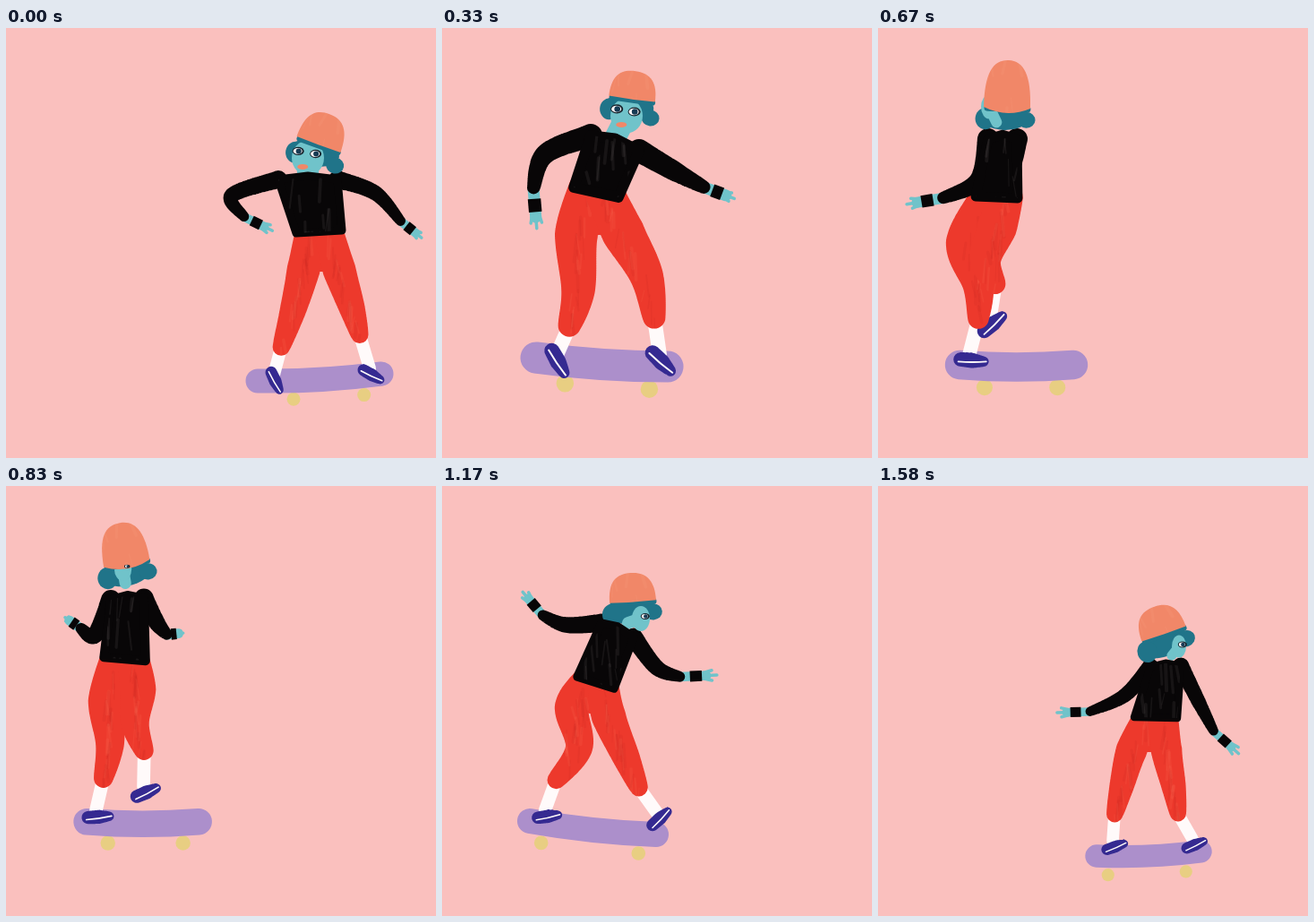
These frames come from a looping animation (480 by 480 pixels, 1660 ms). An HTML page with a canvas:

```html
<!DOCTYPE html>
<html lang="en">
<head>
<meta charset="utf-8">
<title>Skater</title>
<style>
html, body { margin: 0; width: 100%; height: 100%; overflow: hidden; background: #fac0be; }
canvas { display: block; width: 480px; height: 480px; }
</style>
</head>
<body>
<canvas id="stage" width="480" height="480"></canvas>
<script>
const ctx = document.getElementById('stage').getContext('2d');
const LOOP = 1660, STEPS = 20;
const COLOR = {
  ground: '#fac0be', board: '#ac8fcb', wheel: '#e8ce82', shoe: '#352a91', pants: '#ed392c',
  black: '#080607', skin: '#70c3ca', hair: '#207489', hat: '#f18768', white: '#fffafa'
};

// Key poses of the rig; everything else is built around these joints.
// board: two ends, place of the first wheel   waist: left, right
// arms: shoulder, elbow, wrist, fingertip     legs: thigh, knee, ankle
// feet: centre, angle   head: middle of the brim, tilt, hat height
// face: centre, half width, eye size          sweep: extra travel on the way to the next pose
const poses = [
  { step: 0, scale: [1], sweep: [0, 24], board: [281, 394, 419, 386, 0.29], waist: [324, 229, 375, 226],
    armA: [304, 169, 252, 187, 266, 211, 299, 227], armB: [370, 169, 412, 184, 441, 216, 465, 235],
    legA: [332, 270, 320, 316, 307, 357], legB: [372, 270, 386, 312, 395, 343],
    footA: [301, 393, 60], footB: [408, 386, 25], head: [349, 130, 20, 36], face: [337, 145, 18, 5.5] },
  { step: 4, scale: [1.3], sweep: [-28, -14], board: [105, 368, 252, 378, 0.22], waist: [147, 178, 197, 189],
    armA: [166, 120, 115, 141, 102, 179, 106, 226], armB: [220, 137, 260, 160, 293, 178, 328, 191],
    legA: [150, 230, 152, 292, 142, 333], legB: [202, 228, 228, 276, 237, 324],
    footA: [130, 371, 56], footB: [245, 371, 40], head: [212, 79, 8, 31], face: [206, 98, 18, 6] },
  { step: 8, scale: [1.2], sweep: [0, 0], board: [91, 376, 218, 376, 0.22], waist: [109, 188, 156, 190],
    armA: [123, 124, 112, 170, 72, 190, 30, 197], armB: [155, 124, 150, 152, 142, 170, 138, 178],
    legA: [98, 240, 112, 287, 112, 325], legB: [133, 222, 120, 258, 131, 286],
    footA: [104, 370, 0], footB: [127, 330, -45], head: [144, 89, 2, 53], face: [124, 88, 9, 0] },
  { step: 12, scale: [1], sweep: [0, 0], board: [91, 373, 217, 375, 0.15], waist: [116, 196, 162, 203],
    armA: [120, 132, 91, 160, 99, 127, 106, 97], armB: [163, 132, 200, 158, 234, 167, 280, 156],
    legA: [132, 240, 126, 289, 109, 330], legB: [169, 235, 180, 275, 190, 312],
    footA: [104, 367, -13], footB: [199, 358, -8], head: [138, 87, -20, 36], face: [151, 102, 11, 5] },
  { step: 14, scale: [1.04], sweep: [0, 0], board: [98, 374, 239, 389, 0.09], waist: [151, 213, 192, 226],
    armA: [178, 153, 138, 155, 112, 144, 89, 117], armB: [214, 169, 240, 203, 266, 213, 309, 211],
    legA: [145, 247, 153, 292, 127, 329], legB: [186, 257, 206, 304, 220, 337],
    footA: [117, 368, -13], footB: [242, 371, -47], head: [213, 129, -4, 32], face: [222, 148, 10, 4] },
  { step: 17, scale: [1], sweep: [0, 2], board: [180, 399, 303, 403, 0.11], waist: [222, 247, 275, 253],
    armA: [240, 201, 208, 206, 180, 198, 150, 180], armB: [288, 206, 309, 244, 331, 273, 360, 285],
    legA: [223, 285, 214, 325, 200, 355], legB: [257, 290, 268, 332, 277, 366],
    footA: [198, 389, -22], footB: [292, 398, -33], head: [283, 170, -10, 30], face: [295, 185, 6, 0] },
  { step: 19, scale: [0.94], sweep: [0, 0], board: [244, 413, 360, 408, 0.11], waist: [286, 258, 334, 259],
    armA: [304, 202, 275, 234, 236, 252, 198, 253], armB: [338, 201, 358, 241, 375, 274, 404, 300],
    legA: [283, 295, 272, 335, 264, 367], legB: [322, 295, 330, 335, 335, 366],
    footA: [264, 402, -24], footB: [353, 400, -27], head: [319, 165, -19, 32], face: [336, 179, 8, 4] }
];

// Pose with wrap-around, its step shifted by whole loops.
function poseAt(i) {
  const n = poses.length, lap = Math.floor(i / n), parts = poses[i - lap * n];
  return { step: parts.step + lap * STEPS, parts };
}

function blend(step) {
  let i = poses.length - 1;
  while (poses[i].step > step) i--;
  const [p, a, b, q] = [-1, 0, 1, 2].map(k => poseAt(i + k));
  const span = b.step - a.step, u = (step - a.step) / span;
  const hermite = (vp, va, vb, vq) => {
    const ma = (vb - vp) / (b.step - p.step) * span * 0.6;
    const mb = (vq - va) / (q.step - a.step) * span * 0.6;
    const u2 = u * u, u3 = u2 * u;
    return va + (vb - va) * (3 * u2 - 2 * u3) + ma * (u3 - 2 * u2 + u) + mb * (u3 - u2);
  };
  const out = {};
  for (const key in a.parts) {
    if (key === 'step') continue;
    out[key] = a.parts[key].map((v, j) => hermite(p.parts[key][j], v, b.parts[key][j], q.parts[key][j]));
  }
  out.sweep = a.parts.sweep.map(v => v * Math.sin(Math.PI * u));
  return out;
}

function random(seed) {
  return () => {
    seed = (seed * 16807) % 2147483647;
    return seed / 2147483647;
  };
}

const mix = (a, b, t) => a + (b - a) * t;
const between = (a, b, t) => [mix(a[0], b[0], t), mix(a[1], b[1], t)];
const points = list => Array.from({ length: list.length / 2 }, (_, i) => list.slice(2 * i, 2 * i + 2));

function disc(x, y, rx, color, ry = rx, angle = 0) {
  ctx.fillStyle = color;
  ctx.beginPath();
  ctx.ellipse(x, y, Math.max(0, rx), Math.max(0, ry), angle, 0, 7);
  ctx.fill();
}

function stroke(width, color, from, to, bend = between(from, to, 0.5)) {
  ctx.strokeStyle = color;
  ctx.lineWidth = width;
  ctx.beginPath();
  ctx.moveTo(...from);
  ctx.quadraticCurveTo(...bend, ...to);
  ctx.stroke();
}

// Curve through the joints, as wide as given at each of them.
function limb(pts, widths, color) {
  const path = new Path2D(), last = pts.length - 1;
  for (let i = 0; i < last; i++) {
    const p = pts[Math.max(0, i - 1)], a = pts[i], b = pts[i + 1], q = pts[Math.min(last, i + 2)];
    for (let u = 0; u <= 1; u += 0.04) {
      const [x, y] = [0, 1].map(k => 0.5 * (2 * a[k] + (b[k] - p[k]) * u +
        (2 * p[k] - 5 * a[k] + 4 * b[k] - q[k]) * u * u + (3 * a[k] - p[k] - 3 * b[k] + q[k]) * u ** 3));
      const r = mix(widths[i], widths[i + 1], u) / 2;
      path.moveTo(x + r, y);
      path.arc(x, y, r, 0, 2 * Math.PI);
    }
  }
  ctx.fillStyle = color;
  ctx.fill(path);
  return path;
}

function patch(corners, color, rounding) {
  const path = new Path2D();
  corners.forEach(corner => path.lineTo(...corner));
  path.closePath();
  ctx.fillStyle = ctx.strokeStyle = color;
  ctx.lineWidth = rounding;
  ctx.fill(path);
  ctx.stroke(path);
  return path;
}

// Faint dry-brush lines inside a shape.
function brush(path, corners, color, seed, count) {
  const rnd = random(seed), pick = () => corners[Math.floor(rnd() * corners.length)];
  ctx.save();
  ctx.clip(path);
  ctx.globalAlpha = 0.09;
  for (let i = 0; i < count; i++) {
    const [x, y] = between(pick(), pick(), 0.2 + rnd() * 0.6);
    stroke(1 + rnd() * 3, color, [x, y], [x + rnd() * 8 - 4, y + 12 + rnd() * 20]);
  }
  ctx.restore();
}

function arm(list, scale) {
  const pts = points(list), [wrist, tip] = pts.slice(2);
  const dx = tip[0] - wrist[0], dy = tip[1] - wrist[1];
  const along = (t, side = 0) => [wrist[0] + dx * t - dy * side, wrist[1] + dy * t + dx * side];
  const hand = 10 * scale;
  stroke(hand, COLOR.skin, wrist, along(0.68));
  for (const side of [-0.13, 0, 0.13]) stroke(3.5, COLOR.skin, along(0.6, side * 0.6), along(0.95 - Math.abs(side), side));
  ctx.lineCap = 'butt';
  stroke(hand + 1.5, COLOR.black, along(0.25), along(0.56));
  ctx.lineCap = 'round';
  limb(pts.slice(0, 3), [20, 17, 11].map(w => w * scale), COLOR.black);
}

function leg(hip, list, scale, seed) {
  const pts = [hip, ...points(list)];
  const path = limb(pts, [33, 37, 29, 19].map(w => w * scale), COLOR.pants);
  brush(path, pts, '#a81d1b', seed, 12);
  brush(path, pts, '#ff8f70', seed + 7, 9);
}

function foot([x, y, degrees], ankle, scale) {
  stroke(14 * Math.sqrt(scale), COLOR.white, ankle, [x - 2, y - 6]);
  ctx.save();
  ctx.translate(x, y);
  ctx.rotate(degrees * Math.PI / 180);
  ctx.scale(scale, scale);
  limb([[-10, 0], [1, 1], [12, 2]], [13, 14, 9], COLOR.shoe);
  stroke(1.5, COLOR.white, [-12, 2], [14, 2], [1, 7 * Math.sign(degrees + 90) - 4]);
  ctx.restore();
}

function board([x1, y1, x2, y2, firstWheel], scale) {
  const from = [x1, y1], to = [x2, y2], width = 27 * scale;
  for (const t of [firstWheel, 0.86]) {
    const [x, y] = between(from, to, t);
    disc(x, y + width / 2 + 9, 7.5 * scale, COLOR.wheel);
  }
  const [mx, my] = between(from, to, 0.5);
  stroke(width, COLOR.board, from, to, [mx, my + 5]);
}

function eye(x, y, r) {
  if (r < 1) return;
  disc(x, y, r + 1, '#17232c', r * 0.85);
  disc(x - 0.5, y, r - 0.5, COLOR.white, r * 0.62);
  disc(x + 0.5, y, r * 0.55, '#173b54');
}

function head([x, y, degrees, height], [fx, fy, w, eyeSize], neck) {
  const tilt = degrees * Math.PI / 180;
  const front = Math.max(0, Math.min(1, (w - 12) / 6));
  const tilted = drawing => {
    ctx.save();
    ctx.translate(x, y);
    ctx.rotate(tilt * (1 - 0.5 * front));
    drawing();
    ctx.restore();
  };
  tilted(() => {
    disc(-3, 10, 28, COLOR.hair, 15);
    disc(-24, 13, 11, COLOR.hair, 12);
    disc(22, 13 + 7 * front, 10, COLOR.hair, 9);
  });
  stroke(w * 1.35, COLOR.skin, [fx, fy], between([fx, fy], neck, 0.55 + 0.4 * front));
  disc(fx, fy, w, COLOR.skin, w * 0.7 + 7);
  ctx.save();
  ctx.translate(x, y);
  ctx.rotate(tilt);
  stroke(7, COLOR.hair, [-22, 1], [23, 1]);
  const hat = new Path2D();
  hat.moveTo(-26, 0);
  hat.bezierCurveTo(-26, -height * 0.75, -17, -height, 0, -height);
  hat.bezierCurveTo(17, -height, 26, -height * 0.7, 26, 0);
  hat.quadraticCurveTo(0, height > 40 ? 12 : 1, -26, 0);
  ctx.fillStyle = COLOR.hat;
  ctx.fill(hat);
  brush(hat, [[-20, -height], [20, -height], [0, 0]], '#ffb08d', 19, 6);
  ctx.restore();
  eye(fx - w * 0.6, fy - w * 0.42, eyeSize * front);
  eye(fx + w * 0.48, fy - w * 0.25, eyeSize);
  disc(fx - w * 0.32, fy + w * 0.55, 6 * front, COLOR.hat, 3 * front);
}

function draw(step) {
  const s = blend(step), scale = s.scale[0];
  const [left, right] = points(s.waist);
  const shoulderA = s.armA.slice(0, 2), shoulderB = s.armB.slice(0, 2);
  const [nx, ny] = between(shoulderA, shoulderB, 0.5);
  const neck = [nx, ny - 4 * scale];
  ctx.fillStyle = COLOR.ground;
  ctx.fillRect(0, 0, 480, 480);
  ctx.save();
  ctx.translate(...s.sweep);
  ctx.lineCap = ctx.lineJoin = 'round';

  board(s.board, scale);
  foot(s.footA, s.legA.slice(4), scale);
  foot(s.footB, s.legB.slice(4), scale);
  patch([left, right, s.legB.slice(0, 2), s.legA.slice(0, 2)], COLOR.pants, 4);
  leg(between(left, right, 0.3), s.legA, scale, 31 + step);
  leg(between(left, right, 0.7), s.legB, scale, 53 + step);
  arm(s.armA, scale);
  arm(s.armB, scale);
  head(s.head, s.face, neck);
  const chest = [shoulderA, neck, shoulderB, right, left];
  brush(patch(chest, COLOR.black, 9 * scale), chest, '#b5aaa8', 77 + step, 12);
  ctx.restore();
}

// Twelve drawings per second, on a 10 ms grid.
const startOf = step => Math.round(step * 25 / 3) * 10;
let shown = -1;

function tick() {
  const time = performance.now() % LOOP;
  let step = STEPS - 1;
  while (startOf(step) > time) step--;
  if (step !== shown) draw(shown = step);
  requestAnimationFrame(tick);
}
tick();
</script>
</body>
</html>
```
